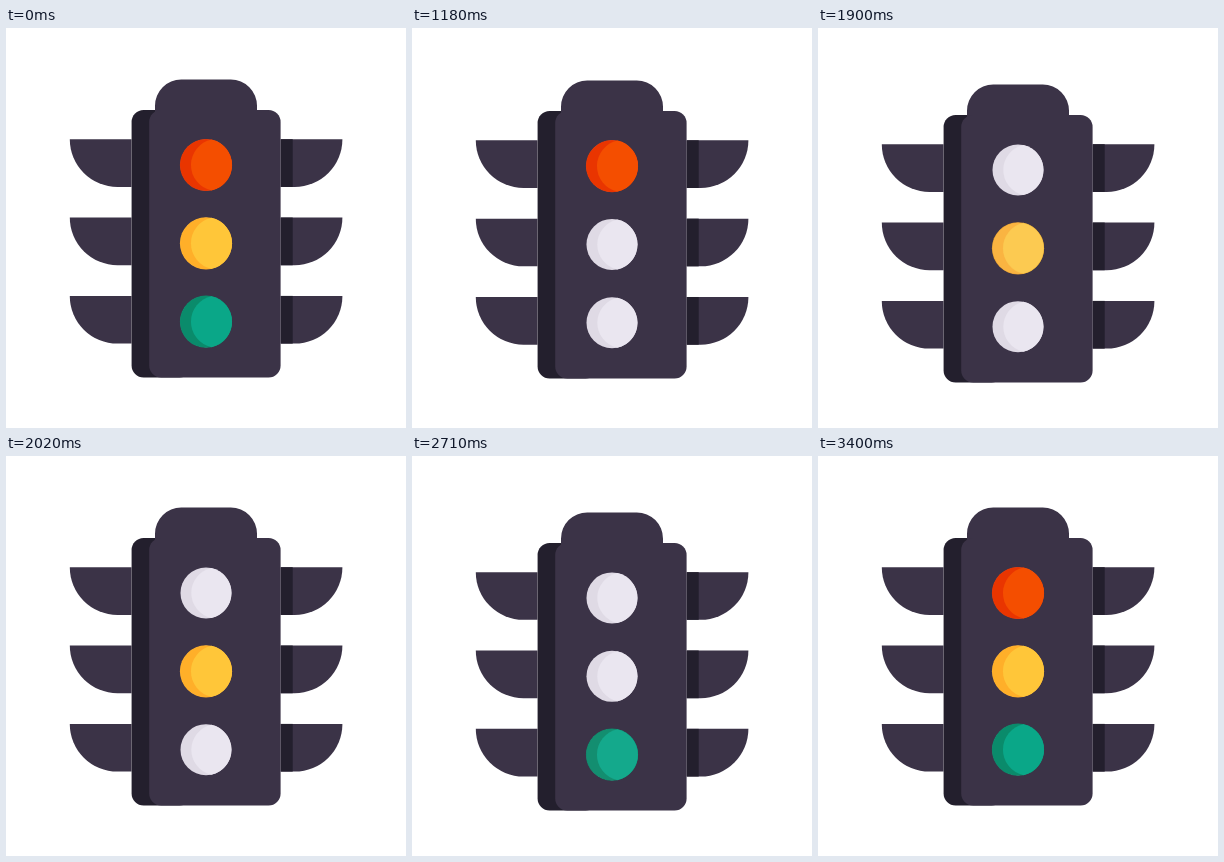
These frames come from a looping animation (400 px wide and 400 px high, 3430 ms). An HTML page:

```html
<!DOCTYPE html>
<html lang="en">
<head>
<meta charset="utf-8">
<title>Traffic light</title>
<style>
  html, body { margin: 0; width: 100%; height: 100%; overflow: hidden; background: #fff; }
  svg { display: block; width: 100%; height: 100%; }
</style>
</head>
<body>
<svg viewBox="0 0 400 400">
  <defs>
    <path id="visor" d="M63.8 111.2H125.5V158.9H111.5A47.7 47.7 0 0 1 63.8 111.2Z"/>
    <path id="lens" d="M5.5 -25.5A26.1 26.1 0 0 1 5.5 25.5A26.1 26.1 0 0 1 5.5 -25.5Z"/>
  </defs>
  <g id="signal" fill="#3b3347">
    <g id="visors"></g>
    <rect x="125.6" y="82" width="60" height="267.5" rx="12" fill="#231f2d"/>
    <path d="M149 86V77.7A26.2 26.2 0 0 1 175.2 51.5H224.8A26.2 26.2 0 0 1 251 77.7V86Z"/>
    <rect x="143.2" y="82" width="131.4" height="267.5" rx="12"/>
    <g id="lamps"></g>
  </g>
</svg>
<script>
const LOOP = 3430, STEP = 30, STEP_SHIFT = 10;
const PRESS_TIME = 190, PRESS_DEPTH = 5, FADE_TIME = 110;
const PRESS_STARTS = [1001, 1804.5, 2605];
const DIM_START = 1030, RESET = 3400;
const ROW_GAP = 78.35;
const COLORS = [['#e93500', '#f44e00'], ['#ffaf29', '#ffc639'], ['#0a8b6b', '#0aa788']];
const OFF = ['#dfdae5', '#eae6f0'];

const byId = id => document.getElementById(id);
const clamp = x => Math.min(1, Math.max(0, x));

const lamp = ([shade, light], scale, attrs = '') =>
  `<g transform="scale(${scale})" ${attrs}>
    <circle r="26.1" fill="${shade}"/><use href="#lens" fill="${light}"/>
  </g>`;

byId('visors').innerHTML = COLORS.map((_, row) =>
  `<g transform="translate(0 ${row * ROW_GAP})">
    <use href="#visor"/>
    <use href="#visor" transform="matrix(-1 0 0 1 400.2 0)"/>
    <rect x="274.7" y="111.2" width="12" height="47.7" fill="#231f2d"/>
  </g>`).join('');

byId('lamps').innerHTML = COLORS.map((color, row) =>
  `<g transform="translate(200 ${137 + row * ROW_GAP})">
    ${lamp(OFF, 0.978)}${lamp(color, 1, 'class="lit"')}
  </g>`).join('');

const litLamps = document.querySelectorAll('.lit');

function pressOffset(t) {
  return PRESS_STARTS.reduce((sum, start) => {
    const p = clamp((t - start) / PRESS_TIME);
    return sum + PRESS_DEPTH * 4 * p * (1 - p);
  }, 0);
}

// All lamps start lit, then each one shines alone in turn.
function lampLevels(t) {
  if (t < DIM_START || t >= RESET) return [1, 1, 1];
  const [, yellowOn, greenOn] = PRESS_STARTS;
  if (t < yellowOn) {
    const rest = 1 - clamp((t - DIM_START) / FADE_TIME);
    return [1, rest, rest];
  }
  if (t < greenOn) return [0, clamp((t - yellowOn) / FADE_TIME), 0];
  return [0, 0, clamp((t - greenOn) / FADE_TIME)];
}

function draw(now) {
  const time = now % LOOP;
  const t = Math.floor((time - STEP_SHIFT) / STEP + 1e-6) * STEP + STEP_SHIFT;
  byId('signal').setAttribute('transform', `translate(0 ${pressOffset(t)})`);
  lampLevels(t).forEach((level, i) => litLamps[i].setAttribute('opacity', level));
}

let origin;
function tick(now) {
  origin ??= now;
  draw(now - origin);
  requestAnimationFrame(tick);
}
draw(0);
requestAnimationFrame(tick);
</script>
</body>
</html>
```
